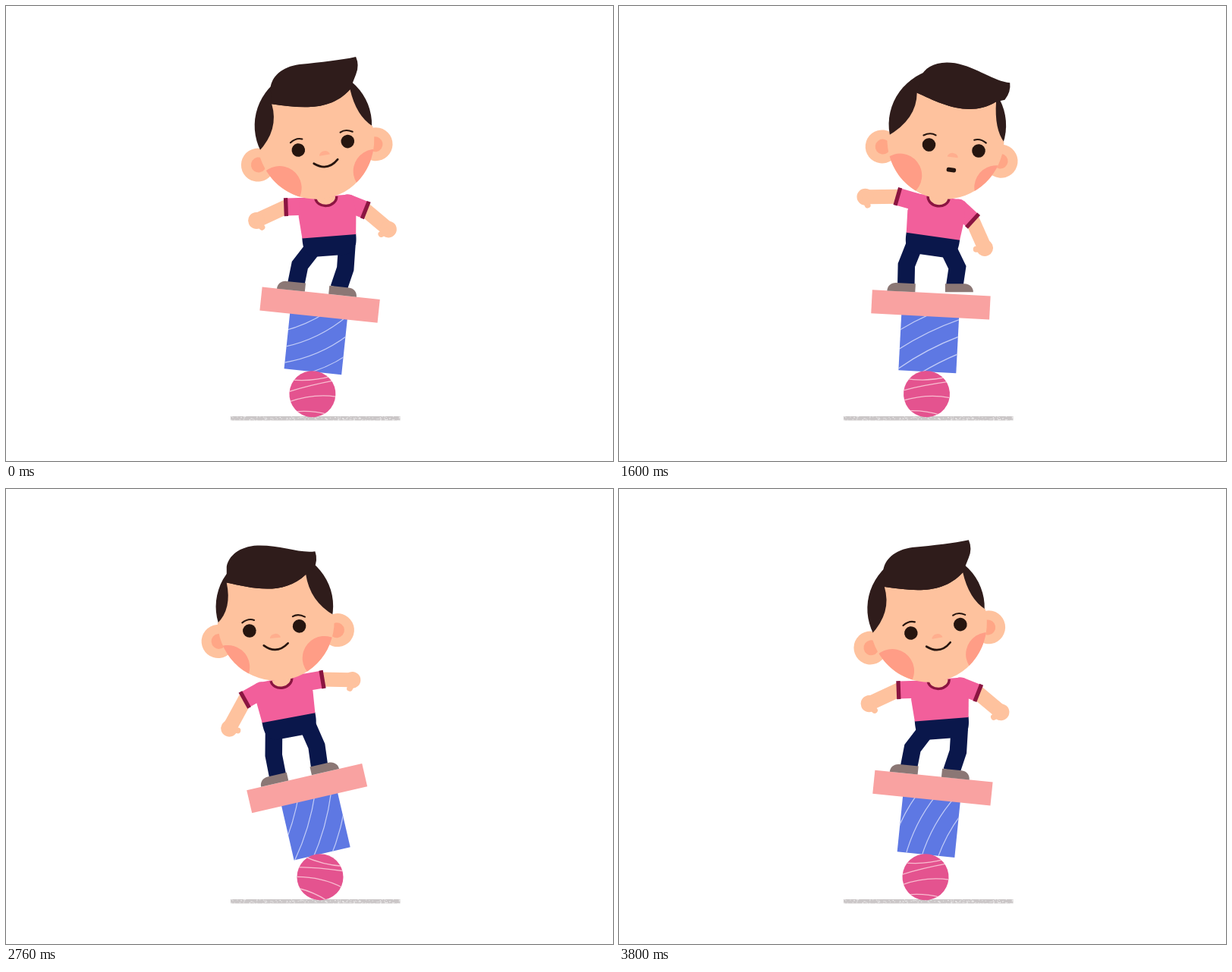
An HTML page with a canvas that plays this animation: 800x600 px, repeating every 3840 ms.

```html
<!DOCTYPE html>
<html lang="en">
<head>
<meta charset="utf-8">
<title>Balancing boy</title>
<style>
html, body { margin: 0; width: 100%; height: 100%; overflow: hidden; background: #fff; }
canvas { display: block; }
</style>
</head>
<body>
<canvas id="stage" width="800" height="600"></canvas>
<script>
const ctx = document.getElementById('stage').getContext('2d');
const LOOP = 3840, STEP = 40, RAD = Math.PI / 180;
const C = {
  hair: '#2f1c1b', skin: '#fec29e', cheek: '#ff9d86', inner: '#ffa686', nose: '#ffae8e',
  shirt: '#f25f9b', trim: '#8b1541', pants: '#0a174b', shoe: '#8b7775', plank: '#f9a2a1',
  block: '#5e78e3', ball: '#e4538f', ink: '#26150f', ground: '#cbc7c8'
};

// Key poses in degrees; turn is how far the face looks sideways, in px.
// Everything else in the body follows from these.
const POSES = [
  { t: 0, lean: 6, torso: -4.5, head: -10, turn: 10, arm: 2 },
  { t: 480, lean: -3, torso: -3, head: -3, turn: 6, arm: 21 },
  { t: 1040, lean: -15, torso: -13.5, head: -4, turn: 8, arm: 31 },
  { t: 1600, lean: 3, torso: 8, head: 7, turn: 15, arm: -16 },
  { t: 1920, lean: 11, torso: 12, head: 3, turn: 6, arm: -9 },
  { t: 2400, lean: -0.7, torso: -4, head: -10, turn: -11, arm: 22 },
  { t: 2840, lean: -15, torso: -11, head: -4, turn: -2, arm: 29 },
  { t: 3200, lean: -16.5, torso: -3.7, head: 1.7, turn: 0, arm: 18 }
];

const clamp = (v, lo, hi) => Math.max(lo, Math.min(hi, v));
const smooth = v => { const s = clamp(v, 0, 1); return s * s * (3 - 2 * s); };
const bump = (t, mid) => Math.cos(clamp((t - mid) / 260, -1, 1) * Math.PI / 2);

function keyAt(i) {
  const n = POSES.length, wrap = Math.floor(i / n), pose = POSES[i - wrap * n];
  return { ...pose, t: pose.t + wrap * LOOP };
}

// Smooth curve through the poses, at rest where the loop closes.
function poseAt(t) {
  let i = POSES.length - 1;
  while (POSES[i].t > t) i--;
  const [a, b, c, d] = [i - 1, i, i + 1, i + 2].map(keyAt);
  const span = c.t - b.t, s = (t - b.t) / span, q = s * s, r = q * s;
  const slope = (from, mid, to, k) => mid.t % LOOP ? (to[k] - from[k]) / (to.t - from.t) * span : 0;
  const pose = {};
  for (const k in b) {
    pose[k] = (2 * r - 3 * q + 1) * b[k] + (r - 2 * q + s) * slope(a, b, c, k)
      + (3 * q - 2 * r) * c[k] + (r - q) * slope(b, c, d, k);
  }
  return pose;
}

function at(x, y, deg, draw) {
  ctx.save();
  ctx.translate(x, y);
  ctx.rotate(deg * RAD);
  draw();
  ctx.restore();
}

function turned(x, y, deg, ox, oy) {
  const c = Math.cos(deg * RAD), s = Math.sin(deg * RAD);
  return [ox + x * c - y * s, oy + x * s + y * c];
}

function disc(x, y, rx, color, ry = rx) {
  ctx.fillStyle = color;
  ctx.beginPath();
  ctx.ellipse(x, y, rx, ry, 0, 0, 2 * Math.PI);
  ctx.fill();
}

function fillPath(color, build) {
  ctx.fillStyle = color;
  ctx.beginPath();
  build();
  ctx.closePath();
  ctx.fill();
}

function strokePath(color, width, build, cap = 'butt') {
  ctx.strokeStyle = color;
  ctx.lineWidth = width;
  ctx.lineCap = cap;
  ctx.beginPath();
  build();
  ctx.stroke();
}

const trace = points => points.forEach(p => ctx.lineTo(p[0], p[1]));
const arch = (x0, y0, cx, cy, x1, y1) => { ctx.moveTo(x0, y0); ctx.quadraticCurveTo(cx, cy, x1, y1); };

function drawGround() {
  ctx.fillStyle = C.ground;
  ctx.fillRect(296, 541, 223.5, 5.5);
  let seed = 7;
  const rnd = () => (seed = seed * 16807 % 2147483647) / 2147483647;
  ctx.fillStyle = 'rgba(255,255,255,.6)';
  for (let i = 0; i < 150; i++) ctx.fillRect(296 + rnd() * 223, 541 + rnd() * 5, 1.3, 1);
}

function drawBall(x) {
  at(x, 511.7, (x - 408) / 30.5 / RAD, () => {
    disc(0, 0, 30.5, C.ball);
    ctx.clip();
    strokePath('#f8bdd0', 1.3, () => {
      arch(-28, -23, 0, -16, 28, -20);
      arch(-32, -7, -6, -12, 32, -14);
      arch(-32, 6, 2, -1, 32, 8);
      arch(-26, 20, -4, 21, 16, 29);
    });
  });
}

function drawBlock(base, lean, t) {
  const grain = -30 - 38 * smooth((t - 1600) / 1600);
  const bow = 6 * Math.cos(t / 2400 * 2 * Math.PI);
  at(...base, lean, () => {
    ctx.save();
    ctx.beginPath();
    ctx.rect(-38, -74, 76, 74);
    ctx.fillStyle = C.block;
    ctx.fill();
    ctx.clip();
    ctx.translate(0, -37);
    ctx.rotate(grain * RAD);
    strokePath('#c3cdf7', 1.2, () => {
      for (let y = -33; y < 40; y += 21) arch(-58, y - bow, 0, y + bow * 2, 58, y - bow);
    });
    ctx.restore();
    ctx.fillStyle = C.plank;
    ctx.fillRect(-78, -104, 156, 31);
  });
}

function drawLeg(side, hip, plank, lean, u, lift) {
  const foot = turned(u, -15.5 - lift, lean, ...plank);
  const tilt = lean - side * lift;
  const ankle = turned(-6 * side, -9, tilt, ...foot);
  const dx = ankle[0] - hip[0], dy = ankle[1] - hip[1], len = Math.hypot(dx, dy);
  const bend = side * clamp((66 - len) * 0.42, 0, 8.5) / len;
  const knee = [hip[0] + dx * 0.53 + dy * bend, hip[1] + dy * 0.53 - dx * bend];
  strokePath(C.pants, 22.5, () => trace([hip, knee, ankle]));
  at(...foot, tilt, () => {
    ctx.scale(side, 1);
    fillPath(C.shoe, () => {
      ctx.moveTo(-18.5, 0);
      ctx.lineTo(-18.5, -11);
      ctx.lineTo(7, -11);
      ctx.bezierCurveTo(14, -11, 18.5, -6, 18.5, 0);
    });
  });
}

function drawArm(side, joint, upper, bend, reach) {
  at(...joint, 0, () => {
    ctx.scale(side, 1);
    ctx.rotate(upper * RAD);
    at(25, 0, bend, () => {
      strokePath(C.skin, 19, () => trace([[-2, 0], [reach - 3, 0]]));
      disc(reach, 0, 11, C.skin);
      strokePath(C.skin, 8, () => trace([[reach, 3], [reach - 3, 11]]), 'round');
    });
    disc(0, 0, 11.5, C.shirt);
    ctx.fillRect(0, -11.5, 25, 23);
    ctx.fillStyle = C.trim;
    ctx.fillRect(22.5, -12, 5.3, 24);
  });
}

function drawTorso(x, y, tilt) {
  at(x, y, tilt, () => {
    fillPath(C.pants, () => {
      ctx.moveTo(-35.5, -1);
      ctx.lineTo(35.5, -1);
      ctx.bezierCurveTo(36, 16, 32, 25.5, 17, 25.5);
      ctx.lineTo(-17, 25.5);
      ctx.bezierCurveTo(-32, 25.5, -36, 16, -35.5, -1);
    });
    const flank = [[14, -53], [28, -53], [35, -49], [38, -29], [35.5, 0]];
    const mirrored = flank.map(([px, py]) => [-px, py]).reverse();
    fillPath(C.shirt, () => trace([...flank, ...mirrored]));
    ctx.beginPath();
    ctx.ellipse(0, -52, 14, 11.5, 0, 0, Math.PI);
    ctx.fillStyle = C.skin;
    ctx.fill();
    ctx.strokeStyle = C.trim;
    ctx.lineWidth = 3.4;
    ctx.stroke();
  });
}

function drawFace(t) {
  const closed = t >= 920 && t < 1160, gasp = t >= 1360 && t < 1960;
  for (const side of [-1, 1]) {
    if (!closed) disc(side * 33, -10, 8.8, C.ink);
    strokePath(C.ink, closed ? 2.4 : 2.1,
      () => arch(side * 25.5, -23.5, side * 33, -27, side * 41.5, -21.5), 'round');
  }
  fillPath(C.nose, () => ctx.ellipse(0, 2.5, 7, 5.5, 0, Math.PI, 2 * Math.PI));
  if (gasp) {
    ctx.fillStyle = C.ink;
    ctx.beginPath();
    ctx.roundRect(-6, 16.5, 12.5, 5.8, 2.6);
    ctx.fill();
  } else {
    strokePath(C.ink, 2.7, () => arch(-16, 11, 0, 25, 16, 11), 'round');
  }
}

function drawHead(neck, tilt, turn, t) {
  const cx = turn * 0.2;
  const quiff = -104 - 14 * ((1 + Math.cos(t / LOOP * 2 * Math.PI)) / 2) ** 2;
  const jaw = (from, to) => ctx.ellipse(cx, -20, 77, 79, 0, from, to);
  const hairline = () => ctx.bezierCurveTo(turn - 25, -66, turn + 15, -51, turn + 48, -77);

  at(...turned(-cx, -58.3, tilt, ...neck), tilt, () => {
    for (const side of [-1, 1]) {
      disc(side * 79, 0, 22, C.skin);
      disc(side * 78, 0, 10, C.inner);
    }
    disc(cx, -39, 77.3, C.hair, 75);

    fillPath(C.skin, () => {
      const right = Math.asin((-1 - 0.3 * turn) / 79), left = Math.PI - Math.asin((-2 + 0.5 * turn) / 79);
      jaw(right, left);
      ctx.quadraticCurveTo(turn - 53, -41, turn - 57, -76);
      hairline();
      ctx.quadraticCurveTo(turn + 50, -41, cx + 77 * Math.cos(right), -20 + 79 * Math.sin(right));
    });

    fillPath(C.hair, () => {
      ctx.moveTo(turn - 57, -76);
      hairline();
      ctx.lineTo(turn + 59, quiff + 23);
      ctx.quadraticCurveTo(turn + 66, quiff + 12, turn + 63, quiff);
      ctx.bezierCurveTo(turn + 42, quiff + 1, turn + 18, -119, turn - 12, -121);
      ctx.bezierCurveTo(turn - 36, -122, turn - 51, -111, turn - 55, -97);
    });

    ctx.save();
    ctx.beginPath();
    jaw(0, 2 * Math.PI);
    ctx.clip();
    disc(turn - 66, 35, 29, C.cheek);
    disc(turn + 62, 35, 29, C.cheek);
    ctx.restore();
    at(turn, 0, 0, () => drawFace(t));
  });
}

function draw(t) {
  const { lean, torso, head, turn, arm } = poseAt(t);
  ctx.fillStyle = '#fff';
  ctx.fillRect(0, 0, 800, 600);

  // The ball rolls under the block so that their contact stays in place.
  const ballX = 407.1 - 30.5 * Math.sin(lean * RAD);
  const base = turned(1.2 - 37 * lean * RAD, -29.6, lean, ballX, 511.9);
  const plank = turned(0, -88.5, lean, ...base);
  drawGround();
  drawBlock(base, lean, t);
  drawBall(ballX);

  // One lifted foot shifts the weight; late in the loop he stretches, then crouches.
  const stepL = bump(t, 2400), stepR = bump(t, 1600);
  const crouch = t > 2000 && t < 3600 ? 13 * Math.cos((t - 3200) / 800 * Math.PI) : 0;
  const hips = [409 + 2.8 * lean + 3.5 * (stepL - stepR), 303.8 + crouch];
  const onBody = (x, y) => turned(x, y, torso, ...hips);

  drawLeg(-1, onBody(-22.5, 14), plank, lean, -40 - 8 * stepL, 4 * stepL);
  drawLeg(1, onBody(22.5, 14), plank, lean, 28.5 + 8 * stepR, 3 * stepR);
  const armR = 24 - 1.15 * arm;
  drawArm(-1, onBody(-28.5, -42), arm, 22 + 0.35 * arm, 43);
  drawArm(1, onBody(28, -42), armR, 13 + 0.25 * armR, 39.5);
  drawTorso(...hips, torso);
  drawHead(onBody(0, -51), head, turn, t);
}

const start = performance.now();
function tick() {
  const t = (performance.now() - start) % LOOP;
  draw(Math.floor(t / STEP) * STEP);
  requestAnimationFrame(tick);
}
tick();
</script>
</body>
</html>
```
